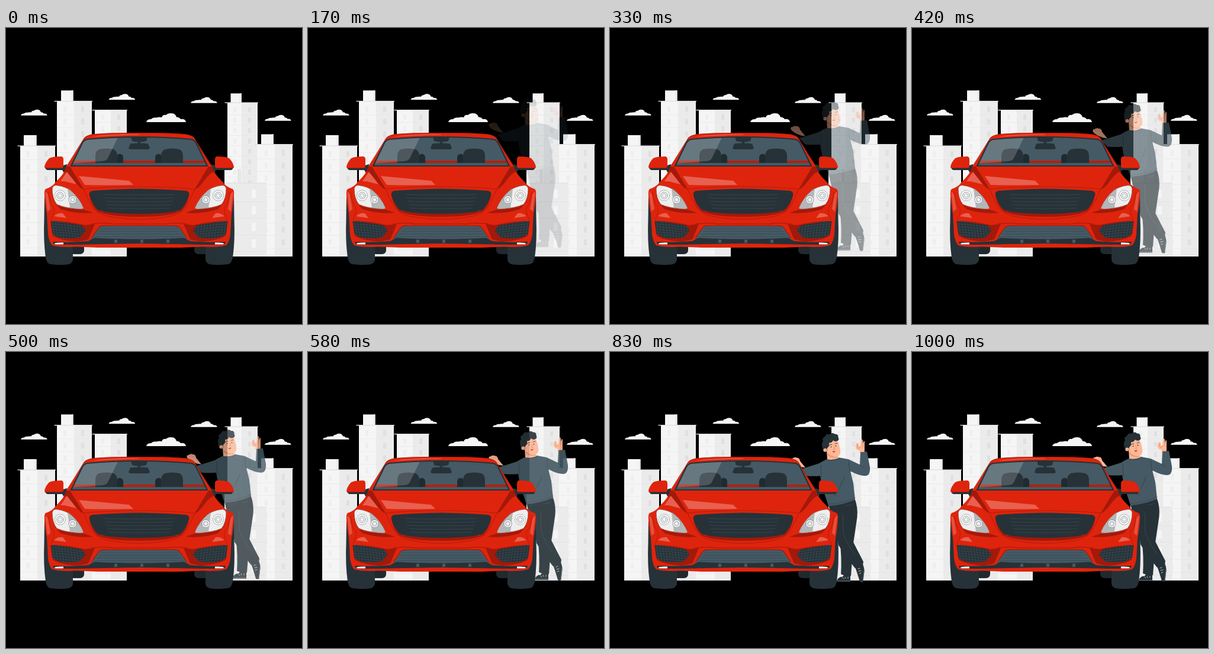
Recreate the animation shown at these times as an HTML page with a canvas. Size 500x500 px, loop 1040 ms.

```html
<!DOCTYPE html>
<html lang="en">
<head>
<meta charset="utf-8">
<title>Car and driver</title>
<style>
html, body { margin: 0; width: 100%; height: 100%; overflow: hidden; background: #000; }
canvas { display: block; width: 500px; height: 500px; }
</style>
</head>
<body>
<canvas id="stage" width="500" height="500"></canvas>
<script>
const SIZE = 500, LOOP = 1040, STEP = 40, DROP = 20;
const RED = '#df240d', DEEP = '#a3190a', PINK = '#e8604f';
const DARK = '#263238', SLATE = '#455a64', SKIN = '#ffb896', BLUSH = '#d9765f';
const PALE = '#f5f5f5', SHADE = '#ebebeb', EDGE = '#e0e0e0';

function layer() {
  const c = document.createElement('canvas');
  c.width = c.height = SIZE;
  return c.getContext('2d');
}
function fill(g, d, color) {
  g.fillStyle = color;
  g.fill(new Path2D(d));
}
function line(g, d, color, width = 0.6) {
  g.strokeStyle = color;
  g.lineWidth = width;
  g.lineCap = g.lineJoin = 'round';
  g.stroke(new Path2D(d));
}
function rect(g, x, y, w, h, color) {
  g.fillStyle = color;
  g.fillRect(x, y, w, h);
}
function ring(g, x, y, r, color, stroke) {
  g.beginPath();
  g.arc(x, y, r, 0, 7);
  g.fillStyle = color;
  g.fill();
  if (stroke) { g.strokeStyle = stroke; g.lineWidth = 0.7; g.stroke(); }
}
// Draws the left side and its mirror image around x = 225.
function both(g, draw) {
  draw();
  g.save();
  g.translate(450, 0);
  g.scale(-1, 1);
  draw();
  g.restore();
}

function tower(g, x, mid, right, top, box, first, step, win) {
  const [bx, bw, by] = box;
  rect(g, bx, by, bw, top - by, PALE);
  rect(g, bx + bw - 3, by, 3, top - by, SHADE);
  rect(g, x, top, mid - x, 386 - top, PALE);
  rect(g, mid, top, right - mid, 386 - top, SHADE);
  for (let y = first; y < 375; y += step) {
    rect(g, win[0], y, 5, step * 0.46, '#eeeeee');
    rect(g, win[1], y, 5, step * 0.46, EDGE);
    rect(g, x, y + step * 0.68, right - x, 0.7, '#e6e6e6');
  }
  rect(g, x - 4.5, top - 0.5, right - x + 5.5, 1.3, EDGE);
}

function cloud(g, x, y, k) {
  g.save();
  g.translate(x, y);
  g.scale(k, k);
  fill(g, 'M0 15.5Q1 10.5 8 10.5Q11 7 17 8Q22 6.5 26 7.5Q28 2.5 33 3.5Q38-1 46 1Q50 3 51 7Q56 7 58 10.5Q66 9.5 67 15.5Z', PALE);
  g.restore();
}

function drawCity(g) {
  rect(g, 0, 0, SIZE, SIZE, '#000');
  tower(g, 86, 115, 145, 123.5, [93, 20.5, 105.5], 132, 21.3, [97, 127]);
  tower(g, 150, 177, 204, 138.5, [160, 0, 138], 146, 19.5, [161, 188]);
  rect(g, 145, 360, 5, 26, PALE);
  tower(g, 24, 53, 83, 199, [30, 21.5, 181], 208, 21.2, [35, 65]);
  tower(g, 374, 398, 425, 126, [379.5, 18.5, 110.5], 134, 17.6, [384, 409]);
  tower(g, 424, 454, 484, 196.5, [431, 21, 179.5], 206, 21.6, [437, 466]);
  rect(g, 369, 240, 5, 24, PALE);
  rect(g, 391, 238, 6, 24, '#e6e6e6');
  rect(g, 369, 262, 71, 124, SHADE);
  rect(g, 369, 261.5, 71, 1, EDGE);
  for (let y = 273; y < 370; y += 28) {
    rect(g, 415, y, 7, 14, PALE);
    rect(g, 369, y + 20, 71, 0.7, EDGE);
  }
  cloud(g, 237, 143.5, 1);
  for (const [x, y] of [[25, 137.5], [173.5, 111], [312, 116.5], [437, 146.5]]) cloud(g, x, y, 0.667);
}

function drawMan(g) {
  // standing leg, crossing leg and shoes
  fill(g, 'M369 257L414 248Q419 262 417.5 278L411 322Q409 350 407 377L390 376Q392 345 388 318L377 290Z', DARK);
  fill(g, 'M378 270L404 278Q406 306 411 320L428 353L427 359L414 364Q398 344 386 325Z', DARK);
  line(g, 'M393 272Q394 290 394 305Q402 326 413 340', '#43525a');
  line(g, 'M409 256Q403 259 398 258', '#43525a');
  fill(g, 'M391 374L406 376L406 387L383 387Q383 381 391 378Z', DARK);
  line(g, 'M384 385.5H406', '#7e898e', 0.6);
  fill(g, 'M387 377L390 374L395 376L392 379Z', '#f0f0f0');
  line(g, 'M393 380L395 382M397 379L398 381M402 379V381', '#e5e5e5', 0.8);
  fill(g, 'M414 362L427 357Q431 367 429 374L427.5 387Q425 389 422 387Q419 376 414 362Z', DARK);
  line(g, 'M419 365L422 364M420 369L424 368M421 373L424 372', '#dce0e2', 0.8);
  line(g, 'M429 368Q428 379 427 386', '#7e898e', 0.7);

  // resting hand
  fill(g, 'M323 193Q309 188 306 183Q304 178.5 308 178.5Q312 175.5 316 177.5Q320 177 321 183L330 194Z', SKIN);
  line(g, 'M309 179L311 182M313 178L315 182M317 178L318 182', BLUSH);

  // raised hand
  fill(g, 'M421 169L422 165Q415 165 415 159Q415 153 418 152Q421 153 420 157L423 158L424 147Q426 145 427 148L427 154L428.5 149Q430.5 149 430 153L430 161Q430 165 430 169Z', SKIN);
  line(g, 'M418 155Q417 159 420 162L424 159M427 154V159', BLUSH);

  // sweater
  fill(g, 'M320 197.5L353 187Q359 183 368 179L387 177L403 180L422 189L423 168L434 167L439 193Q440 208 431 208Q421 208 406 200L411 220L414 248Q395 257 369 259L358 225L355 208Q345 209 330 208Z', SLATE);
  line(g, 'M404 183Q403 193 406 201M422 189Q425 193 428 194M356 189L357 211', '#2e3d45', 0.7);
  line(g, 'M395 210Q392 226 379 240M396 211L388 226M379 240L384 242M369 256Q394 254 414 245', '#32434b');
  line(g, 'M367 181Q377 183 387 179', '#2e3d45', 0.7);

  // head
  fill(g, 'M367 180L366 166L384 166L386 178Q376 182 367 180Z', SKIN);
  fill(g, 'M367 169Q373 176 384 175.5L384 177Q373 179 367 172Z', '#ec9577');
  fill(g, 'M366 150Q375 144 384 146L387 156Q390 165 389 170Q386 177 378 175.5Q367 171 365 160Z', SKIN);
  fill(g, 'M360 166Q356 153 360 149Q357 144 363 142Q365 136 371 138Q376 133.5 380 137.5Q386 137 385.5 143Q388 147 384 149Q380 151 377 148Q374 153 370 152Q371 158 367 161L366 167Z', DARK);
  ring(g, 363.5, 164.5, 3, SKIN);
  line(g, 'M363 163Q365 164 364 167', BLUSH);
  line(g, 'M370 157Q372 154 375 155M380 154Q382 152 384 153', DARK, 0.9);
  ring(g, 373.5, 159, 0.9, DARK);
  ring(g, 381.5, 157.5, 0.9, DARK);
  line(g, 'M378 158L379.5 163L377 163', BLUSH, 0.7);
  fill(g, 'M375.5 166Q378 167 380.5 165Q380 168.5 378 168.5Q376 168.5 375.5 166Z', '#b9492f');
}

function drawFogLamp(g) {
  const open = 'M76 328Q77 326 82 326L126 333Q132 336 134 343L124 354Q110 356 95 355Q84 353 78 347Z';
  fill(g, 'M75 326Q100 325 134 333L150 331Q145 343 139 357L122 361Q92 359 79 351Z', DEEP);
  fill(g, open, DARK);
  g.save();
  g.clip(new Path2D(open));
  for (let i = 0; i < 12; i++) {
    const x = 78 + i * 5;
    line(g, `M${x} 322L${x + 5} 358`, '#4b5b63', 0.45);
    if (i < 7) line(g, `M74 ${326 + i * 4.5}Q105 ${328 + i * 4.5} 136 ${334 + i * 4}`, '#4b5b63', 0.45);
  }
  g.restore();
}

function drawHeadlight(g) {
  const lens = 'M78 271Q80 264.5 87 266Q101 268 110 275Q124 287 131 304Q130 306 125 306Q99 304 86 298Q78 288 78 271Z';
  fill(g, 'M78 290Q84 301 101 304L132 307L147 312Q120 315 92 306Z', DEEP);
  fill(g, lens, '#eeeeee');
  fill(g, 'M104 271Q106 271 110 275Q124 287 131 304Q130 306 125 306L108 304.5Q106 288 104 271Z', '#b4b7b8');
  line(g, lens, '#7e3a32');
  ring(g, 91.5, 283, 9, '#fafafa', '#8e9599');
  ring(g, 91.5, 283, 5.8, '#eeeeee', '#777f84');
  ring(g, 91.5, 283, 3, '#ffffff', '#8e9599');
  ring(g, 112.5, 290, 6.6, '#f7f7f7', '#777f84');
  ring(g, 112.5, 290, 3.8, '#e4e4e4', '#777f84');
  ring(g, 112.5, 290, 1.6, '#ffffff');
}

function drawCabin(g) {
  const glass = 'M137 188Q180 184 225 184Q270 184 313 188Q318 189 321 194L340 233L110 233L129 194Q132 189 137 188Z';
  fill(g, glass, SLATE);
  g.save();
  g.clip(new Path2D(glass));
  rect(g, 110, 224, 230, 4, '#b81d0d');
  both(g, () => {
    fill(g, 'M186 228L188 215Q189 212 193 213Q197 213 198 218V228Z', '#202b30');
    fill(g, 'M151 228V216Q151 208 157 205Q169 202 182 205Q188 208 188 217V228Z', DARK);
  });
  fill(g, 'M211 184H239L237 191Q225 194 213 191Z', DARK);
  rect(g, 223, 190, 4, 6, DARK);
  fill(g, 'M210 195.5Q225 193.5 240 195.5L243 203Q242 205 239 205H211Q208 205 207 203Z', DARK);
  fill(g, 'M128 186L190 183L172 220Q170 224 163 225L108 229Z', 'rgba(255,255,255,.18)');
  g.restore();
  line(g, glass, DARK, 2.2);
}

function drawCar(g) {
  both(g, () => {
    fill(g, 'M108 366H132V376Q131 382 124 382H108Z', '#1f292e');
    fill(g, 'M65 285L113 320V392Q111 399 104 399.5Q88 401 75 399Q69 398 67 388Q63 360 64.5 322Z', DARK);
    fill(g, 'M67 235L97 232L103 230L102 242L98 245L95 240L70 240Q66 239 67 235Z', DARK);
    fill(g, 'M65 234Q67 226 73 220Q78 217 94 217Q97 218 97 222V234L95 237H67Q65 237 65 234Z', RED);
    line(g, 'M67 236.5H95', DEEP, 1);
  });

  both(g, () => {
    fill(g, 'M225 177Q178 176.5 150 179Q137 180 132 185.5Q121 205 102 234Q99 246 84 260Q79 268 67 272Q64 275 65 283Q66 300 69 314L71 349Q73 362 78 367Q90 371 120 369.5L155 371H225Z', RED);
    rect(g, 224, 177, 2, 194, RED);
    line(g, 'M225 177.5Q178 177 150 179.5Q137 180.5 132 186L102 234', DEEP, 0.7);
  });
  fill(g, 'M145 184Q170 179 225 179.5L225 180.5Q180 181 145 184Z', PINK);
  drawCabin(g);

  // hood
  both(g, () => {
    fill(g, 'M102 234L108 234Q119 252 131 272L127 271Q112 256 98 244Z', DEEP);
    fill(g, 'M100 243Q108 247 119 263L127 272Q117 266 99 260L88 260Z', RED);
    line(g, 'M131 272Q175 268 225 268', DEEP, 0.7);
    line(g, 'M131 272Q137 286 143 297Q150 312 168 317Q195 323 225 323', DEEP, 0.8);
  });
  fill(g, 'M103 243L119 264L99 259L92 259Z', PINK);
  fill(g, 'M123 250Q165 254 208 258L215 265Q167 266 133 265Z', PINK);

  // main grille
  both(g, () => {
    fill(g, 'M140 278Q143 300 155 310Q175 319 225.5 319V310H160Z', DEEP);
    fill(g, 'M225.5 271.5Q180 272 146 275Q140 276 141 282Q144 295 154 306Q162 313 225.5 314Z', DARK);
    for (let i = 0; i < 5; i++) line(g, `M${165 + i * 2} ${281 + i * 5.8}Q180 ${282 + i * 5.8} 225 ${282 + i * 5.8}`, '#42535b');
  });

  // bumper
  both(g, () => {
    drawHeadlight(g);
    fill(g, 'M66 277Q69 277 71 282L75 306L70 310Z', '#e5513f');
    line(g, 'M72 278Q74 297 80 302Q84 308 76 325', DEEP, 0.7);
    fill(g, 'M81 318Q87 312 96 313L102 321Z', PINK);
    drawFogLamp(g);
    line(g, 'M144 331Q168 328 180 331H225', DEEP, 1);
    fill(g, 'M225.5 334H168Q160 333 156 338L145 354Q142 358 150 358H225.5Z', SLATE);
    for (let i = 0; i < 4; i++) line(g, `M${160 - i * 3} ${339 + i * 4.5}H225`, '#34464f');
    line(g, 'M225 334H168Q160 333 156 338L145 354', DEEP, 1.2);
    fill(g, 'M79 361Q110 363 139 360L149 354.5Q185 356.5 225.5 356.5V364Q160 365 120 366H84Q80 366 79 361Z', DARK);
    fill(g, 'M82 364Q83 362 97 362.5V365.5H85Q82 366 82 364Z', '#fff');
  });
  for (const x of [183, 227, 271]) rect(g, x, 357.5, 5, 5.5, SLATE);
}

// Progress along cubic-bezier(.36, -.01, .5, 1.38), with a soft overshoot.
function ease(p) {
  const bez = (a, b, s) => 3 * (1 - s) ** 2 * s * a + 3 * (1 - s) * s * s * b + s ** 3;
  let lo = 0, hi = 1;
  for (let i = 0; i < 24; i++) {
    const m = (lo + hi) / 2;
    if (bez(0.36, 0.5, m) < p) lo = m; else hi = m;
  }
  return bez(-0.01, 1.38, lo);
}

const stage = document.getElementById('stage').getContext('2d');
const city = layer(), man = layer(), car = layer();
drawCity(city);
drawCar(car);

function render(now) {
  const t = now % LOOP;
  const k = t < STEP ? 0 : ease(Math.min(1, (t + STEP) / LOOP));
  stage.globalAlpha = 1;
  stage.drawImage(city.canvas, 0, 0);
  if (k > 0) {
    man.setTransform(1, 0, 0, 1, 0, 0);
    man.clearRect(0, 0, SIZE, SIZE);
    man.translate(0, DROP * (k - 1));
    drawMan(man);
    stage.globalAlpha = Math.min(1, k);
    stage.drawImage(man.canvas, 0, 0);
    stage.globalAlpha = 1;
  }
  stage.drawImage(car.canvas, 0, 0);
}

const start = performance.now();
function tick() {
  render(performance.now() - start);
  requestAnimationFrame(tick);
}
tick();
</script>
</body>
</html>
```
